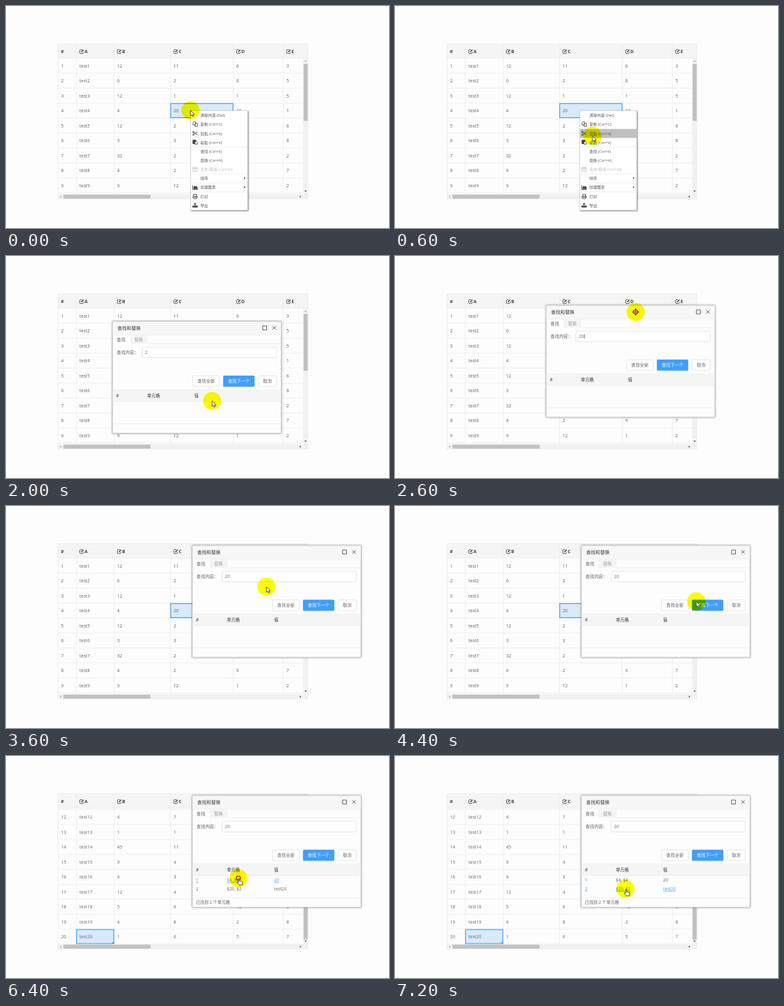
These frames come from a looping animation (600 by 349 pixels, 8000 ms). An HTML page:

```html
<!DOCTYPE html>
<html>
<head>
<meta charset="utf-8">
<title>Find in table</title>
<style>
html, body { margin: 0; width: 100%; height: 100%; overflow: hidden; background: #fdfdfe; }
svg { display: block; width: 600px; height: 349px; }
text { font: 7px "Open Sans", "Noto Sans CJK SC", "Noto Sans CJK", sans-serif; fill: #606266; white-space: pre; }
.line { stroke: #ebebee; stroke-width: .8; fill: none; }
.head text { font-weight: 700; fill: #444; }
.icon { stroke: #444; stroke-width: .9; fill: none; }
.menu text { font-size: 6.05px; fill: #555; }
.menu .off { fill: #bbb; }
.menu .box { filter: drop-shadow(1px 1px 1.2px rgba(0,0,0,.5)); }
.dialog .box { filter: drop-shadow(0 0 1.8px rgba(0,0,0,.5)); }
.dialog text { font-size: 6.8px; }
.dialog .title { font-size: 7.3px; fill: #333; }
.dialog .th { font-weight: 500; fill: #333; }
.field { fill: #fff; stroke: #dcdfe6; stroke-width: .8; }

.a { animation: 8s step-end infinite; }
.body { animation-name: scroll; }
.thumb { animation-name: thumb; }
.menu { animation-name: menu; }
.hover { animation-name: hover; }
.dialog { animation-name: drag; }
.key1 { animation-name: key1; }
.key2 { animation-name: key2; }
.caret { animation-name: caret; }
.found { animation-name: found; }
.hot1 { animation-name: hot1; }
.hot2 { animation-name: hot2; }
.move { animation-name: move; }
.spot { mix-blend-mode: multiply; }
.arrow { animation-name: arrow; }
.hand { animation-name: hand; }
.cross { animation-name: cross; }
.ring { animation-name: ring; }

@keyframes scroll {
  0% { transform: none; }
  72.5%, 90%, 100% { transform: translateY(-256.5px); }
  82.5% { transform: translateY(-70.5px); }
}
@keyframes thumb {
  0% { transform: none; }
  72.5%, 90%, 100% { transform: translateY(108px); }
  82.5% { transform: translateY(30px); }
}
@keyframes menu {
  0% { transform: none; }
  22.5%, 100% { transform: translateY(-400px); }
}
@keyframes hover {
  0% { transform: translateY(-400px); }
  2.5% { transform: translateY(0); animation-timing-function: steps(4); }
  12.5%, 100% { transform: translateY(56.6px); }
}
@keyframes drag {
  0% { transform: translate(167px, -400px); }
  22.5% { transform: translate(167px, 103px); }
  32.5% { transform: translate(237px, 77.7px); }
  35% { transform: translate(285px, 64px); }
  37.5%, 100% { transform: translate(292px, 62.3px); }
}
@keyframes key1 { 0% { opacity: 0; } 25%, 100% { opacity: 1; } }
@keyframes key2 { 0% { opacity: 0; } 27.5%, 100% { opacity: 1; } }
@keyframes caret { 0% { opacity: 0; } 27.5% { opacity: 1; } 35%, 100% { opacity: 0; } }
@keyframes found { 0% { opacity: 0; } 60%, 100% { opacity: 1; } }
@keyframes hot1 {
  0%, 67.5%, 85%, 100% { fill: #606266; text-decoration: none; }
  65%, 77.5% { fill: #409eff; text-decoration: underline; }
}
@keyframes hot2 {
  0%, 77.5% { fill: #606266; text-decoration: none; }
  67.5%, 85%, 100% { fill: #409eff; text-decoration: underline; }
}
@keyframes move {
  0% { transform: translate(289px, 164px); animation-timing-function: steps(5); }
  12.5% { transform: translate(323px, 231px); }
  15% { transform: translate(324px, 233px); }
  17.5% { transform: translate(323px, 228px); }
  27.5% { transform: translate(314px, 150px); }
  30% { transform: translate(307px, 113px); }
  32.5% { transform: translate(377px, 88px); }
  35% { transform: translate(425px, 74px); }
  37.5% { transform: translate(432px, 70px); }
  40% { transform: translate(430px, 82px); }
  42.5% { transform: translate(418px, 108px); }
  45% { transform: translate(408px, 127px); }
  47.5% { transform: translate(418px, 124px); }
  50% { transform: translate(440px, 128px); }
  52.5% { transform: translate(464px, 140px); }
  55% { transform: translate(472px, 150px); }
  57.5% { transform: translate(440px, 156px); }
  60% { transform: translate(439px, 157px); }
  62.5% { transform: translate(410px, 172px); }
  65% { transform: translate(364px, 194px); }
  67.5% { transform: translate(362px, 206px); }
  70% { transform: translate(361px, 209px); }
  77.5% { transform: translate(363px, 200px); }
  80% { transform: translate(364px, 192px); }
  82.5% { transform: translate(364px, 193px); }
  85% { transform: translate(362px, 205px); }
  87.5%, 100% { transform: translate(361px, 209px); }
}
@keyframes arrow {
  0%, 40%, 62.5% { opacity: 1; }
  30%, 57.5%, 65%, 100% { opacity: 0; }
}
@keyframes hand {
  0%, 62.5% { opacity: 0; }
  57.5%, 65%, 100% { opacity: 1; }
}
@keyframes cross { 0%, 40%, 100% { opacity: 0; } 30% { opacity: 1; } }
@keyframes ring {
  0%, 22.5%, 37.5%, 60%, 72.5%, 82.5%, 90%, 100% { opacity: 0; }
  20%, 32.5%, 57.5%, 70%, 80%, 87.5% { opacity: 1; }
}
</style>
</head>
<body>
<svg viewBox="0 0 600 349">
  <defs>
    <clipPath id="view"><rect x="81" y="82" width="384.5" height="213.5"/></clipPath>
    <g id="edit" class="icon">
      <path d="M4.3 -4.6H1.5Q.5 -4.6 .5 -3.6V.4Q.5 1.4 1.5 1.4H5Q6 1.4 6 .4V-1"/>
      <path d="M2.8 -.8L6.4 -4.6" stroke-width="1.5"/>
    </g>
  </defs>
  <rect width="600" height="349" fill="#fdfdfe"/>

  <g clip-path="url(#view)"><g id="body" class="a body"></g></g>
  <g id="head" class="head"><rect x="81" y="59" width="392" height="23" fill="#f5f5f6"/></g>
  <path class="line" d="M81.4 304V59.4H473V304"/>

  <g fill="#f1f1f2">
    <rect x="465.5" y="82.4" width="7.5" height="221.6"/>
    <rect x="81.5" y="295.5" width="391" height="8.5"/>
  </g>
  <rect class="a thumb" x="466.2" y="91" width="6.4" height="89.5" fill="#c1c1c3"/>
  <rect x="90" y="296.6" width="136.5" height="6.2" fill="#c1c1c3"/>
  <path fill="#a3a3a3" d="M467.6 87.5h3.6l-1.8 -2zM86.4 297.9v3.6l-2 -1.8z"/>
  <path fill="#444" d="M467.6 290.2h3.6l-1.8 2zM460.4 297.9v3.6l2 -1.8z"/>

  <g class="a menu">
    <rect class="box" x="289.3" y="164.5" width="89.4" height="156.5" fill="#fff" stroke="#c8c8c8" stroke-width=".6"/>
    <rect class="a hover" x="290" y="165" width="88.3" height="14.1" fill="#bfbfbf"/>
    <path class="line" d="M290 221.3h88M290 264h88M290 278.1h88M290 292.3h88"/>
    <g id="items"></g>
    <path fill="#555" d="M373 268.7v3.8l2.2 -1.9zM373 282.9v3.8l2.2 -1.9z"/>
    <g class="icon">
      <path d="M293 183.2l1.6 -1.2h2.2v5h-4zM296 185.2l1.3 -1h2.7v5h-4z" fill="#fff"/>
      <path d="M293.5 198.5L300 202.5M293.5 202L300 198"/>
      <circle cx="293.6" cy="198" r="1.1"/><circle cx="293.6" cy="202.4" r="1.1"/>
      <path d="M292.8 210.8h4.6v5.8h-4.6z" fill="#444"/>
      <path d="M296 213.2h2.6l1.4 1.3v2.7h-4z" fill="#fff"/>
      <path d="M292.7 253.8h6.6v6.2h-6.6zM292.7 255.3h6.6M296 254v6" stroke="#c4c4c4"/>
      <path d="M292.6 281.5v7h8"/>
      <path d="M294 287.2v-2.2l1.8 -2 1.7 1.6 1.3 -1.4 1.3 4z" fill="#444"/>
      <path d="M294 299v-3h4.5v3M292.8 302v-3h7v3M294.2 300.5h4.2v2.4h-4.2z"/>
      <path d="M292.4 314.2h7.6v2h-7.6z" fill="#444"/>
      <path d="M296.2 309.5v2" stroke-width="2"/>
      <path d="M294 311.4h4.4l-2.2 2.2z" fill="#444" stroke="none"/>
    </g>
  </g>

  <g class="a dialog">
    <rect class="box" width="264" height="175.4" fill="#fdfdfe" stroke="#c4c4c6" stroke-width=".7"/>
    <rect x=".4" y=".4" width="263.2" height="20.6" fill="#f7f7f8"/>
    <path class="line" d="M0 21h264M55 35h209"/>
    <text class="title" x="7.5" y="13.3">查找和替换</text>
    <path class="icon" d="M235.2 7h6.2v6.2h-6.2zM250.5 7.3l5.4 5.4M255.9 7.3l-5.4 5.4"/>
    <rect x="27" y="21.4" width="28" height="13.6" fill="#f4f4f5"/>
    <text x="6.6" y="30.6">查找</text>
    <text x="34" y="30.6" style="fill:#a0a0a0">替换</text>
    <text x="6.6" y="51.1">查找内容：</text>
    <rect class="field" x="46.5" y="40.2" width="210.3" height="16.6" rx="1.5"/>
    <text x="51" y="51.1"><tspan class="a k"></tspan></text>
    <text class="a key1" x="51" y="51.1">2</text>
    <text class="a key2" x="54.9" y="51.1">0</text>
    <path class="a caret" d="M59.8 44.8v7.4" stroke="#333" stroke-width=".7"/>
    <g text-anchor="middle">
      <rect class="field" x="125.6" y="85.4" width="41.8" height="16.6" rx="1.5"/>
      <text x="146.5" y="96.3">查找全部</text>
      <rect x="173.2" y="85" width="49.2" height="17.4" rx="1.5" fill="#409eff"/>
      <text x="197.8" y="96.3" style="fill:#fff">查找下一个</text>
      <rect class="field" x="228.4" y="85.4" width="28.4" height="16.6" rx="1.5"/>
      <text x="242.6" y="96.3">取消</text>
    </g>
    <rect x=".4" y="107.6" width="263.2" height="18.2" fill="#f5f5f6"/>
    <path class="line" d="M0 107.6h264M0 125.8h264M0 160.8h264"/>
    <text class="th" x="5.5" y="119.3">#</text>
    <text class="th" x="54" y="119.3">单元格</text>
    <text class="th" x="128" y="119.3">值</text>
    <g class="a found">
      <g id="hits"></g>
      <text x="5.6" y="170.4" style="font-size:6.6px">已找到 2 个单元格</text>
    </g>
  </g>

  <circle class="a move spot" r="14.2" fill="#ff0"/>
  <g class="a move" stroke-linejoin="round">
    <circle class="a ring" r="3.2" fill="none" stroke="#e0201a" stroke-width="1.6"/>
    <path class="a arrow" d="M0 0V8.6L2 6.8L3.4 9.8L4.8 9.1L3.5 6.3H6.1Z" fill="#fff" stroke="#222" stroke-width=".8"/>
    <path class="a hand" d="M.3 1Q1.2 -.2 2 1V4.6L5.5 5.2Q7 5.5 6.8 7L6.2 10.8H1.2L-1.7 7.2Q-2 5.8 -.7 6.1L.3 7Z" fill="#fff" stroke="#222" stroke-width=".8"/>
    <path class="a cross" d="M0 -5.5L2 -3.3H.6V-.6H3.3V-2L5.5 0L3.3 2V.6H.6V3.3H2L0 5.5L-2 3.3H-.6V.6H-3.3V2L-5.5 0L-3.3 -2V-.6H-.6V-3.3H-2Z" fill="#222" stroke="#fff" stroke-width=".3"/>
  </g>
</svg>
<script>
const $ = id => document.getElementById(id);
const text = (x, y, s, cls = "") => `<text x="${x}" y="${y}" class="${cls}">${s}</text>`;
const edges = [81.4, 110.2, 169.2, 257.7, 356, 434.4];
const top0 = 82.2, step = 23.5;

// One string per column, rows 1 to 20
const cols = [
  "12 6 12 4 12 3 32 4 9 7 2 4 1 45 9 4 12 5 4 1",
  "11 2 1 20 2 3 2 2 12 5 9 7 1 11 4 3 4 6 8 6",
  "6 8 1 10 4 5 3 9 1 3 6 2 4 7 1 8 3 10 2 5",
  "3 5 5 1 6 8 2 7 2 4 1 3 6 2 5 9 4 6 8 7"
].map(s => s.split(" "));

const pick = (x, w, row) => {
  const y = top0 + (row - 1) * step;
  return `<rect x="${x + .3}" y="${y + .7}" width="${w - .6}" height="${step - 1.4}" fill="#d9eafb" stroke="#409eff" stroke-width="1.3"/>
    <rect x="${x + w - 3}" y="${y + step - 3.2}" width="2.6" height="2.6" fill="#409eff"/>`;
};

let rows = "", grid = "";
for (let i = 0; i < 20; i++) {
  const y = top0 + i * step, base = (y + 14.4).toFixed(1);
  grid += `M81 ${y + step}H466`;
  const cells = [i + 1, "test" + (i + 1), ...cols.map(c => c[i])];
  cells.forEach((v, c) => rows += text(edges[c] + 4.8, base, v));
}
edges.forEach(x => grid += `M${x} 82V560`);
$("body").innerHTML = `<path class="line" d="${grid}"/>`
  + pick(edges[3], 98.3, 4) + pick(edges[1], 59, 20) + rows;

let head = text(86, 74.1, "#") + `<path class="line" d="M81 82H473${edges.map(x => `M${x} 59V82`).join("")}"/>`;
[..."ABCDE"].forEach((s, i) => {
  const x = edges[i + 1] + 4.8;
  head += `<use href="#edit" x="${x}" y="73.3"/>` + text(x + 8, 74.1, s);
});
$("head").innerHTML += head;

$("items").innerHTML = ["清除内容 (Del)", "复制 (Ctrl+C)", "剪贴 (Ctrl+X)", "粘贴 (Ctrl+V)", "查找 (Ctrl+F)",
  "替换 (Ctrl+H)", "合并/取消 (Ctrl+M)", "排序", "创建图表", "打印", "导出"]
  .map((s, i) => text(304.4, (174.2 + 14.15 * i).toFixed(1), s, i === 6 ? "off" : "")).join("");

$("hits").innerHTML = [["1", "$4, $4", "20"], ["2", "$20, $2", "test20"]]
  .map((r, i) => r.map((s, c) => text([5.5, 54, 128][c], 135.2 + 13.7 * i, s, "a hot" + (i + 1))).join("")).join("");
</script>
</body>
</html>
```
